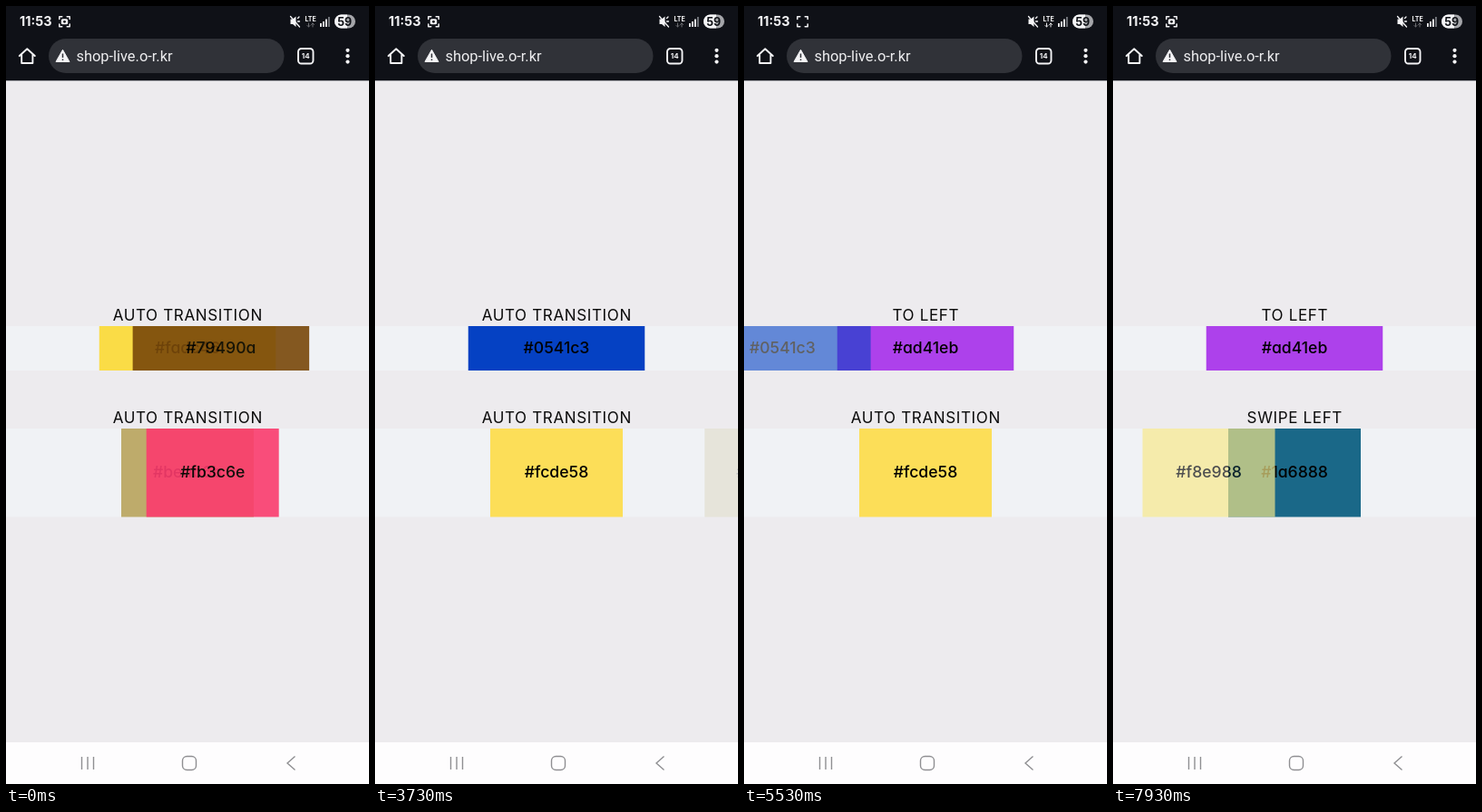
An HTML page that plays this animation: 400 px wide and 858 px high, repeating every 8000 ms.

```html
<!DOCTYPE html>
<html lang="en">
<head>
<meta charset="utf-8">
<title>Swipe cards</title>
<style>
  html, body { margin: 0; width: 100%; height: 100%; overflow: hidden; background: #edebee; }
  svg { display: block; }
  text { font-family: Inter, sans-serif; }
  .label { font-size: 17px; letter-spacing: .65px; text-anchor: middle; fill: #0a0a0a; }
  .hex { font-size: 17.6px; font-weight: 500; text-anchor: middle; font-feature-settings: "cv11"; }
  .line { fill: none; stroke: #f4f4f6; stroke-linecap: round; stroke-linejoin: round; }
  .nav { fill: none; stroke: #8f8f92; stroke-width: 1.4; }
</style>
</head>
<body>
<svg id="stage" width="400" height="858" viewBox="0 0 400 858">
  <rect width="400" height="858" fill="#edebee"/>
  <g id="rows"></g>

  <!-- status bar -->
  <rect width="400" height="83" fill="#a5a5aa"/>
  <rect width="400" height="82" fill="#0f1117"/>
  <g fill="#f4f4f6">
    <text x="15" y="22" font-size="14.4" font-weight="700">11:53</text>
    <path class="line" stroke-width="1.5" d="M58.8 14.5v-2.7h3M67.2 11.8h3v2.7M70.2 20v2.7h-3M61.8 22.7h-3V20"/>
    <g id="camera">
      <rect x="60.8" y="14.3" width="7.4" height="6" rx="1.6"/>
      <circle cx="64.5" cy="17.3" r="1.4" fill="#0f1117"/>
    </g>
    <path d="M313.5 14.5h2.5l3.5-3v11.5l-3.5-3h-2.5z"/>
    <path class="line" stroke-width="1.3" d="M313.5 11.5l10 11.5M321.5 13.5l1.5-1.5M321.5 17h2"/>
    <text x="329.5" y="17.3" font-size="7" font-weight="700">LTE</text>
    <g id="traffic">
      <path class="line" stroke-width="1" d="M333.5 19v4m-1.5-1.5l1.5 1.5 1.5-1.5"/>
      <path class="line" stroke-width="1" d="M338 23v-4m-1.5 1.5l1.5-1.5 1.5 1.5"/>
    </g>
    <path d="M346 19h1.8v4H346zM349 17h1.8v6H349zM352 14.5h1.8V23H352z"/>
    <path d="M355 12h1.8v11H355z" fill="#777a80"/>
    <rect x="362" y="9.5" width="23" height="15" rx="7.5" fill="#a5a6aa"/>
    <path d="M369.5 9.5H376v15h-6.5a7.5 7.5 0 0 1 0-15z"/>
    <text x="373.3" y="21.5" font-size="12.5" font-weight="700" text-anchor="middle" fill="#111318">59</text>
  </g>

  <!-- address bar -->
  <rect x="47" y="36" width="259.5" height="38" rx="19" fill="#303238"/>
  <path class="line" stroke-width="1.9" d="M14.8 55L23.3 47.2 31.8 55M17.2 53.5V63h12.2v-9.5"/>
  <path d="M62.5 48.3L70 61.5H55z" fill="#f4f4f6" stroke="#f4f4f6" stroke-linejoin="round"/>
  <path d="M62.5 52.5v4.5M62.5 58.6v1.5" stroke="#303238" stroke-width="1.5"/>
  <text x="77.5" y="61" font-size="16.4" fill="#eeeef0" style="font-family: Roboto, sans-serif">shop-live.o-r.kr</text>
  <rect class="line" x="322" y="47" width="16.5" height="16.5" rx="3.5" stroke-width="1.9"/>
  <text x="330.2" y="58.4" font-size="8" font-weight="700" text-anchor="middle" fill="#f4f4f6">14</text>
  <g fill="#f4f4f6">
    <circle cx="376.5" cy="48.8" r="2.1"/>
    <circle cx="376.5" cy="55.2" r="2.1"/>
    <circle cx="376.5" cy="61.6" r="2.1"/>
  </g>

  <!-- navigation bar -->
  <rect y="812" width="400" height="46" fill="#fefdfe"/>
  <path class="nav" d="M83.5 828v14M90 828v14M96.5 828v14"/>
  <rect class="nav" x="194.5" y="827.5" width="15" height="15" rx="4.8"/>
  <path class="nav" d="M318.5 827.5l-8.5 7.5 8.5 7.5"/>
</svg>
<script>
const LOOP = 8000, FRAME = 200 / 3, FLIGHT = 500, EXIT = 2;
const byId = id => document.getElementById(id);

const auto = at => ({ begin: at, settle: at, release: at, dir: 1, reach: 0, auto: true });
const swipe = (dir, begin, settle, release, reach) => ({ begin, settle, release, dir, reach });

// reach: drag distance in card widths; each move uncovers the next colour
const rows = [
  { y: 353, height: 49, width: 194.5,
    colors: ["#79490a", "#fadc46", "#0541c3", "#ad41eb"],
    moves: [auto(-50), auto(3480), swipe(-1, 4027, 5200, 5465, 0.586)] },
  { y: 466, height: 97.5, width: 146,
    colors: ["#fb3c6e", "#beab6b", "#fcde58", "#f8e988", "#1a6888"],
    moves: [auto(-50), auto(3480), swipe(1, 5960, 6670, 6997, 0.687), swipe(-1, 7560, 8150, 8400, 0.748)] }
];

function add(parent, tag, attrs) {
  const node = document.createElementNS("http://www.w3.org/2000/svg", tag);
  for (const name in attrs) node.setAttribute(name, attrs[name]);
  return parent.appendChild(node);
}

function makeCard({ y, height, width }) {
  const group = add(byId("rows"), "g", {});
  const rect = add(group, "rect", { x: 200 - width / 2, y, width, height });
  const text = add(group, "text", { class: "hex", x: 200, y: y + height / 2 + 5.5 });
  return {
    group,
    paint(color) {
      rect.setAttribute("fill", color);
      text.textContent = color;
    }
  };
}

for (const row of rows) {
  add(byId("rows"), "rect", { y: row.y, width: 400, height: row.height, fill: "#f0f2f5" });
  row.label = add(byId("rows"), "text", { class: "label", x: 200.3, y: row.y - 6.3 });
  row.under = makeCard(row);
  row.over = makeCard(row);
}

const clamp = v => Math.min(1, Math.max(0, v));

// cubic-bezier(.25, .1, .25, 1), the CSS "ease" curve
function ease(x) {
  const curve = (a, b, s) => 3 * a * s * (1 - s) ** 2 + 3 * b * s * s * (1 - s) + s ** 3;
  let low = 0, high = 1;
  for (let i = 0; i < 20; i++) {
    const mid = (low + high) / 2;
    if (curve(0.25, 0.25, mid) < x) low = mid; else high = mid;
  }
  return curve(0.1, 1, low);
}

function distance(move, t) {
  if (t >= move.release) {
    return move.reach + (EXIT - move.reach) * ease(clamp((t - move.release) / FLIGHT));
  }
  const drag = clamp((t - move.begin) / (move.settle - move.begin));
  return move.reach * (1 - (1 - drag) ** 2);
}

function caption(move, t) {
  if (move.auto) return "AUTO TRANSITION";
  return (t < move.release ? "SWIPE " : "TO ") + (move.dir < 0 ? "LEFT" : "RIGHT");
}

function drawRow(row, t) {
  const index = row.moves.findLastIndex(move => t >= move.begin);
  const move = row.moves[index];
  const shift = distance(move, t);
  row.label.textContent = caption(move, t);
  row.under.paint(row.colors[index + 1]);
  row.over.paint(row.colors[index]);
  row.over.group.setAttribute("transform", `translate(${move.dir * shift * row.width} 0)`);
  row.over.group.setAttribute("opacity", 1 - shift / EXIT);
}

function draw(now) {
  const t = Math.floor((now % LOOP + 4) / FRAME) * FRAME % LOOP;
  for (const row of rows) drawRow(row, t);
  byId("camera").style.display = (t + 280) % 1000 < 475 ? "" : "none";
  const busy = [1, 4, 5, 7].includes(Math.floor((t + 70) / 1000));
  byId("traffic").setAttribute("opacity", busy ? 0.95 : 0.4);
}

const start = performance.now();
function tick() {
  draw(performance.now() - start);
  requestAnimationFrame(tick);
}
tick();
</script>
</body>
</html>
```
